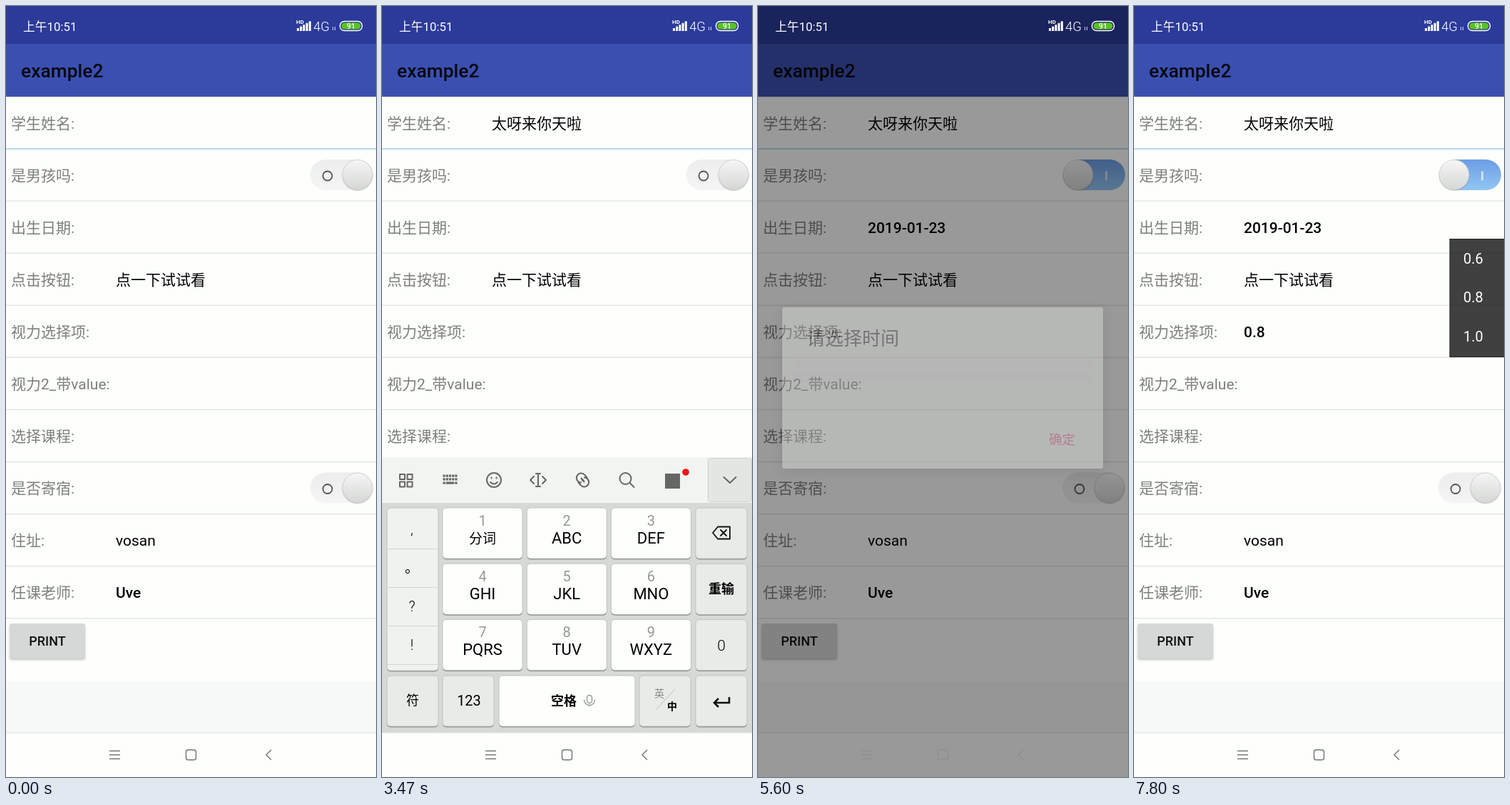
Recreate the animation shown at these times as an HTML page. Size 519 by 1080 pixels, loop 8000 ms.

```html
<!DOCTYPE html>
<html lang="zh-CN">
<head>
<meta charset="utf-8">
<title>Form demo</title>
<style>
html, body { margin: 0; width: 100%; height: 100%; overflow: hidden; background: #fdfffc; }
svg { display: block; width: 100vw; height: 100vh; }
text { font-family: Roboto, "Noto Sans CJK SC", "Noto Sans CJK", sans-serif; font-size: 21px; fill: #000; white-space: pre; }
.mid { text-anchor: middle; }
.label { fill: #7d7f7c; font-weight: 300; }
.label tspan { font-weight: 400; }
.light { font-weight: 300; }
.bold { font-weight: 500; }
.icon { fill: none; stroke: #666; stroke-width: 2; stroke-linecap: round; stroke-linejoin: round; }
</style>
</head>
<body>
<svg id="stage" viewBox="0 0 519 1080" preserveAspectRatio="none"></svg>
<script>
const rect = (x, y, w, h, fill, more = '') =>
  `<rect x="${x}" y="${y}" width="${w}" height="${h}" fill="${fill}" ${more}/>`;
const text = (x, y, s, more = '') => `<text x="${x}" y="${y}" ${more}>${s}</text>`;
const path = (d, more = 'class="icon"') => `<path d="${d}" ${more}/>`;
const group = (id, body, more = '') => `<g id="${id}" ${more}>${body}</g>`;

const PITCH = 73.1;
const rowText = i => 171.5 + i * PITCH;
const CHARS = '太呀来你天啦';

function toggle(id, y) {
  return `<g transform="translate(0 ${y})">
    ${rect(427, -21.5, 88, 43, 'url(#offTrack)', `rx="21.5" id="${id}Off"`)}
    ${rect(431, -21.5, 84, 43, 'url(#onTrack)', `rx="21.5" id="${id}On" opacity="0"`)}
    <g id="${id}O"><circle cx="451" cy="1.5" r="6.5" fill="none" stroke="#555" stroke-width="1.8"/></g>
    <g id="${id}I" opacity="0">${rect(487, -5, 3, 13, '#cfe0f6')}</g>
    <g id="${id}Knob"><circle cx="493" cy="1" r="21.5" fill="#000" opacity=".16"/>
    <circle cx="493" cy="0" r="21" fill="url(#knob)" stroke="#c9cbc9" stroke-width=".8"/></g></g>`;
}

function page() {
  const labels = ['学生姓名', '是男孩吗', '出生日期', '点击按钮', '视力选择项',
    '视力<tspan>2_</tspan>带<tspan>value</tspan>', '选择课程', '是否寄宿', '住址', '任课老师'];
  let s = rect(0, 0, 519, 1080, '#fdfffc') + rect(0, 946, 519, 72, '#f7f9f8');
  labels.forEach((l, i) => {
    s += text(7, rowText(i), l + '<tspan>:</tspan>', 'class="label"');
    s += rect(0, 199.3 + i * PITCH, 519, i ? 1.2 : 1.6, i ? '#e0e2df' : '#a5d3e8');
  });
  s += rect(154, 0, 364, 65, '#000', 'id="touch" opacity="0"');
  s += text(154, rowText(0), '', 'id="name" class="light"');
  s += text(154, rowText(3), '点一下试试看', 'class="light"');
  s += text(154, rowText(2), '2019-01-23', 'id="date" class="bold"');
  s += text(154, rowText(4), '0.8', 'id="sight" class="bold"');
  s += text(154, rowText(8), 'vosan') + text(154, rowText(9), 'Uve', 'class="bold"');
  s += rect(154, 149, 3, 29, '#f9437f', 'id="cursor"');
  s += toggle('boy', 236.5) + toggle('stay', 675);
  s += rect(5, 867, 106, 49, '#000', 'rx="3" opacity=".22" filter="url(#soft)"');
  s += rect(5, 865, 106, 49, '#d6d8d7', 'rx="3"');
  s += text(58, 896, 'PRINT', 'class="mid bold" style="font-size:18px;fill:#111"');
  s += rect(0, 0, 519, 53, '#2c3b99') + rect(0, 53, 519, 74, '#3b4fb1');
  s += rect(0, 127, 519, 2, 'url(#barShade)');
  return s + text(21, 100, 'example2', 'class="bold" style="font-size:26.4px;fill:#08090d"');
}

function key(x, y, w, fill) {
  return rect(x, y + 1.5, w, 71, '#8f918f', 'rx="5"') +
    rect(x, y, w, 71, fill, 'rx="5" stroke="#b9bbb8" stroke-width=".8"');
}

function tools() {
  let s = '';
  for (const x of [25, 35.5]) for (const y of [656, 666.5]) s += rect(x, y, 7, 7, 'none', 'class="icon"');
  for (let r = 0; r < 2; r++) for (let c = 0; c < 5; c++) s += rect(85.5 + c * 4.2, 656.5 + r * 4.8, 3.2, 3.2, '#666');
  s += rect(85.5, 666.5, 3.2, 3.2, '#666') + rect(89.7, 666.5, 11.6, 3.2, '#666') + rect(102.3, 666.5, 3.2, 3.2, '#666');
  s += '<circle cx="157" cy="664" r="10" class="icon"/>' + path('M152 667Q157 672 162 667M153.5 660.5v1M160.5 660.5v1');
  s += path('M219 655V673M216 655h6M216 673h6M213 659l-5 5 5 5M225 659l5 5-5 5');
  s += path('M283 665l-3.5-3.5M279 667.5a6.5 6.5 0 1 1 5.5-10.5l3 3.5M280 663l3.5 3.5M284 660.5a6.5 6.5 0 1 1-5.5 10.5l-3-3.5');
  s += '<circle cx="341.5" cy="662" r="8" class="icon"/>' + path('M347.5 668l6 6');
  s += rect(397, 655, 21, 21, '#666') + '<circle cx="426" cy="653" r="4.8" fill="#f01414"/>';
  s += rect(457.5, 633.5, 61, 61, '#e4e6e3', 'id="fold" rx="3" stroke="#cfd1ce"');
  return s + path('M479.5 660l8.5 8 8.5-8');
}

function keyboard() {
  let s = rect(0, 632, 519, 65, '#f2f4f1') + rect(0, 696, 519, 322, '#d7d9d6');
  s += group('tools', tools());
  const spots = [40, 105, 161, 218, 274, 330, 386, 442];
  s += group('picks', spots.map((x, i) =>
    text(x, 674, '', `class="mid light pick" style="font-size:26px;fill:${i ? '#111' : '#1591d6'}"`)).join('') +
    path('M481.5 660h13l-6.5 9z', 'fill="#777"'));

  s += key(7, 703, 72, '#f0f2ef').replaceAll('height="71"', 'height="228"');
  for (let i = 0; i < 4; i++) {
    s += rect(7, 760 + i * 54, 72, 1, '#d3d5d2');
    s += text(42, 740 + i * 54, '', 'class="mid light side" style="font-size:20px"');
  }
  const names = ['分词', 'ABC', 'DEF', 'GHI', 'JKL', 'MNO', 'PQRS', 'TUV', 'WXYZ'];
  names.forEach((n, i) => {
    const x = 85 + i % 3 * 118.2, y = 703 + Math.floor(i / 3) * 78.2;
    s += key(x, y, 112, '#fdfffc');
    s += text(x + 56, y + 25, i + 1, 'class="mid" style="fill:#979996;font-size:20px"');
    s += text(x + 56, y + 50, n, `class="mid" style="font-size:${i ? 22 : 19}px"`);
  });
  for (let r = 0; r < 4; r++) s += key(440, 703 + r * 78.3, 72, '#e9ebe8');
  s += key(7, 938, 72, '#e9ebe8') + key(85, 938, 72, '#e9ebe8') + key(164, 938, 191, '#fdfffc') + key(361, 938, 72, '#e9ebe8');
  s += path('M464 738l7-8.5h17v17h-17zM475 734l8 8M483 734l-8 8', 'class="icon" style="stroke:#111;stroke-width:1.8"');
  s += text(476, 823, '重输', 'class="mid" style="font-size:18px;font-weight:700"');
  s += text(476, 903, '0', 'class="mid light"');
  s += text(43, 979, '符', 'class="mid" style="font-size:18px"') + text(122, 979.5, '123', 'class="mid" style="font-size:20px"');
  s += text(255, 979.5, '空格', 'class="mid" style="font-size:18px;font-weight:700"');
  s += rect(287.5, 965.5, 7, 11, 'none', 'rx="3.5" stroke="#999" stroke-width="1.4"');
  s += path('M283.5 972a7.5 7.5 0 0 0 15 0M291 979.5v2', 'fill="none" stroke="#999" stroke-width="1.4"');
  s += text(389, 968, '英', 'class="mid" style="font-size:14px;fill:#888"') + text(407, 986, '中', 'class="mid" style="font-size:14px;font-weight:700"');
  s += path('M384 986L411 957', 'stroke="#bbb"');
  return s + path('M487 968v8h-20M472 970l-6 6 6 6', 'fill="none" stroke="#111" stroke-width="2.6"');
}

function dialog() {
  return rect(34, 426, 450, 226, '#000', 'opacity=".28" filter="url(#wide)"') +
    rect(34, 422, 450, 226, '#fdfffc', 'rx="3"') +
    text(68, 474.5, '请选择时间', 'class="light" style="font-size:26px;fill:#222"') +
    rect(50, 495, 418, 13, '#f7f5f6') + rect(50, 514, 418, 13, '#f7f5f6') +
    text(408, 614, '确定', 'style="font-size:18.5px;fill:#f9437f"');
}

const popup = () => rect(443, .5, 80, 165, 'rgba(0,0,0,.75)', 'stroke="#222" stroke-width="1"') +
  ['0.6', '0.8', '1.0'].map((v, i) => text(476, 35 + i * 54.3, v, 'class="mid" style="font-size:20px;fill:#fff"')).join('');

function status() {
  let s = text(24, 35, '上午10:51', 'style="font-size:16.8px;fill:#fff"');
  s += text(407, 25, 'HD', 'style="font-size:8px;fill:#fff;font-weight:700"');
  for (let i = 0; i < 5; i++) s += rect(408 + i * 4.2, 31 - i * 2.4, 3, 4 + i * 2.4, '#fff');
  s += text(431, 35, '4G', 'class="light" style="font-size:18.5px;fill:#fff"');
  s += path('M458.5 29v5M461.5 29v5', 'stroke="#fff" opacity=".8"');
  s += rect(468.5, 21.5, 31, 13, 'none', 'rx="6" stroke="#fff" stroke-width="1.4"') + rect(470.5, 23.5, 27, 9, '#54c41e', 'rx="4.5"');
  return s + text(484, 32, '91', 'class="mid bold" style="font-size:10.5px;fill:#fff"');
}

const shade = (id, stops) => `<linearGradient id="${id}" x2="0" y2="1">` +
  stops.map((c, i) => `<stop offset="${i}" stop-color="${c}"/>`).join('') + '</linearGradient>';
const blur = (id, n) => `<filter id="${id}" x="-20%" y="-30%" width="140%" height="160%"><feGaussianBlur stdDeviation="${n}"/></filter>`;

document.getElementById('stage').innerHTML = '<defs>' +
  shade('offTrack', ['#ecedec', '#f4f5f4']) + shade('onTrack', ['#6c9de6', '#92c6f2']) +
  shade('knob', ['#f5f6f5', '#d5d7d5']) + shade('barShade', ['#dfe1e4', '#fdfffc']) +
  blur('soft', 1.5) + blur('wide', 9) + '</defs>' +
  page() + group('keys', keyboard()) +
  group('popup', popup()) +
  rect(0, 1018, 519, 62, '#fdfffc') + rect(0, 1017.5, 519, 1, '#e0e2df') +
  rect(0, 0, 519, 1080, '#000', 'id="dim"') + group('dialog', dialog()) + status() +
  group('nav', path('M145 1043.5h15M145 1049h15M145 1054.5h15') +
    rect(252.5, 1042, 14, 14, 'none', 'rx="3"') + path('M372 1042l-7 7 7 7'),
    'fill="none" stroke-width="1.5"').replaceAll('class="icon"', '');

const el = {};
document.querySelectorAll('[id]').forEach(e => el[e.id] = e);
const picks = document.querySelectorAll('.pick'), side = document.querySelectorAll('.side');
const fade = (e, a) => e.setAttribute('opacity', a);
const shift = (e, x, y) => e.setAttribute('transform', `translate(${x} ${y})`);
const within = (q, a, b) => q >= a && q < b;
const clamp = x => Math.max(0, Math.min(1, x));

// Times below count ticks of 1/15 s.
const compose = [28, 31, 34, 37, 40, 44], commit = [30, 33, 36, 39, 43, 45];
const choices = ['他图太提条调通退', '呀我要有下一在想', '来就看可见开叫今',
  '你那没能吗年呢买', '天他图太提条调通', '啦就看来可见开叫'];
const columns = ['uvt8', 'yxwz', 'lkj5', 'nmo6', 'uvt8', 'lkj5'];

function keyboardShift(q) {
  if (q < 10 || q >= 57) return 400;
  if (q >= 55) return (q - 54) * 130;
  return 386 * Math.pow(1 - clamp((q - 9) / 9), 2);
}

// Step through a list of values starting at a tick, holding the last one.
const steps = (q, start, list) => list[Math.min(q - start, list.length - 1)];

function draw(q) {
  const typed = commit.filter(c => q >= c).length;
  const turn = compose.findIndex((c, i) => within(q, c, commit[i]));
  const typing = turn >= 0;
  el.name.textContent = CHARS.slice(0, typed);
  el.cursor.setAttribute('x', 154 + 21 * typed);
  fade(el.cursor, +(within(q, 9, 16) || within(q, 24, 52) || within(q, 60, 67)));
  shift(el.keys, 0, keyboardShift(q));
  fade(el.tools, +!typing);
  fade(el.picks, +typing);
  fade(el.fold, +(q >= 51));
  picks.forEach((p, i) => p.textContent = typing ? choices[turn][i] : '');
  side.forEach((p, i) => p.textContent = (typing ? columns[turn] : ',。?!')[i]);

  const on = clamp((q - 59) / 4);
  shift(el.boyKnob, -44 * on, 0);
  fade(el.boyOn, on);
  fade(el.boyOff, 1 - on);
  fade(el.boyO, 1 - on);
  fade(el.boyI, on);

  const row = q === 67 ? 2 : within(q, 93, 95) ? 4 : within(q, 112, 114) ? 5 : -1;
  fade(el.touch, row < 0 ? 0 : .05);
  el.touch.setAttribute('y', 131 + row * PITCH);

  let seen = 0, dim = 0;
  if (within(q, 71, 84)) {
    seen = steps(q, 71, [.3, .65, .9, 1]);
    dim = steps(q, 71, [0, .2, .4, .6]);
  } else if (q >= 84) {
    seen = steps(q, 84, [.3, .08, 0]);
    dim = steps(q, 84, [.4, .2, 0]);
  }
  fade(el.dialog, seen);
  fade(el.dim, dim);
  const gray = Math.round(119 + 60 * dim);
  el.nav.setAttribute('stroke', `rgb(${gray},${gray},${gray})`);
  fade(el.date, +(q >= 84));
  fade(el.sight, +(q >= 104));

  const rise = [.3, .6, .85, 1];
  let list = 0;
  if (within(q, 95, 104)) list = steps(q, 95, rise);
  else if (within(q, 104, 108)) list = steps(q, 104, [.85, .5, .2, 0]);
  else if (q >= 114) list = steps(q, 114, rise);
  fade(el.popup, list);
  shift(el.popup, 0, q < 110 ? 493 : 326);
}

function frame(now) {
  draw(Math.min(119, Math.floor(now % 8000 * .015 + .1)));
  requestAnimationFrame(frame);
}
draw(0);
requestAnimationFrame(frame);
</script>
</body>
</html>
```
